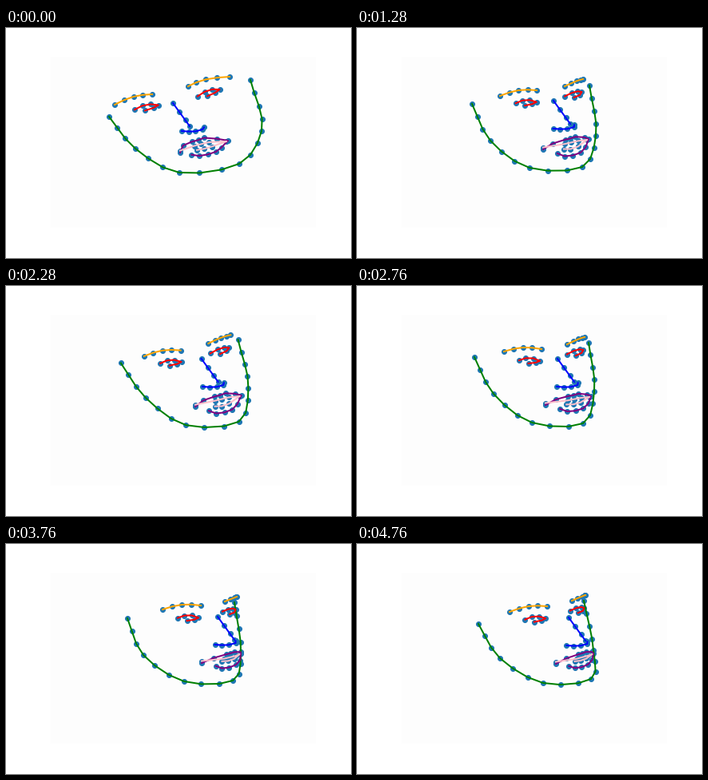
A matplotlib script for the animation above (4800 ms loop, 432 by 288 pixels).

```python
import numpy as np
import matplotlib.pyplot as plt
from matplotlib.animation import FuncAnimation
from matplotlib.patches import Rectangle

W, H, DPI = 432, 288, 72
FRAMES, STEP = 120, 40

# Face parts in landmark order: colour and number of points.
PARTS = [("green", 17), ("orange", 5), ("orange", 5), ("blue", 4), ("blue", 5),
         ("red", 6), ("red", 6), ("purple", 12), ("pink", 8)]
JAW_KNOTS = np.array([0, 3, 6, 9, 12, 16])


def mix(a, b, k):
    return a + (b - a) * k


def along(a, b, part, drop):
    """Points at fractions of the line from a to b, moved down by drop."""
    part, drop = np.broadcast_arrays(part, drop)
    return a + np.outer(part, b - a) + np.outer(drop, (0, 1))


def jaw_curve(knots):
    """Smooth cubic through the knots, sampled at the 17 jaw landmarks."""
    slope = np.gradient(knots, JAW_KNOTS, axis=0)
    i = np.arange(17)
    j = np.clip(np.searchsorted(JAW_KNOTS, i, "right") - 1, 0, 4)
    span = (JAW_KNOTS[j + 1] - JAW_KNOTS[j])[:, None]
    s = (i - JAW_KNOTS[j])[:, None] / span
    ease = s * s * (3 - 2 * s)
    return (mix(knots[j], knots[j + 1], ease)
            + span * s * (1 - s) * ((1 - s) * slope[j] - s * slope[j + 1]))


def eye(a, b, skew=0):
    part = np.array([0, 0.32, 0.67, 1, 0.79, 0.44])
    drop = np.array([0, -3, -3, 0, 2.3, 3.6])
    inner = part % 1 > 0
    return along(a, b, part + skew * inner, drop + 10 * skew * inner)


def lips(a, b, k, gap):
    """Outer and inner lips between corners a and b; k is the squared turn."""
    top = mix(np.array([0.06, 0.25, 0.38, 0.5, 0.77]),
              np.array([0.31, 0.63, 0.73, 0.84, 0.99]), k)
    low = np.array([0.86, 0.75, 0.58, 0.4, 0.24]) + 0.12 * k
    top_drop = (7 * k - 10.5) * np.array([0.75, 0.95, 0.95, 1.05, 0.55])
    low_drop = gap * np.array([0.6, 0.92, 1, 0.92, 0.57])
    outer = along(a, b, np.r_[0, top, 1, low], np.r_[0, top_drop, 0, low_drop])

    top = np.array([0.3, 0.44, 0.6]) + 0.28 * k
    low = np.array([0.66, 0.5, 0.35]) + 0.17 * k
    low_drop = 0.8 * (gap - 8) * np.array([1, 1.15, 0.85])
    inner = along(a, b, np.r_[0, top, 0.97, low],
                  np.r_[-2.5, np.full(3, 5.5 * k - 4), 0.5, low_drop])
    return outer, inner


def face(jaw, brow_l, brow_r, tip, mouth, gap):
    """Build all landmarks from a few key points; gap is the lower lip's drop."""
    jaw, brow_l, brow_r, tip, mouth = map(np.array, (jaw, brow_l, brow_r, tip, mouth))
    s = np.linspace(0, 1, 5)
    arch = -3.5 * np.sin(np.pi * s)

    # The far brow shortens as the head turns away.
    turn = (52 - (brow_r[1] - brow_r[0])[0]) / 37
    k = turn * turn
    left = along(*brow_l, s, arch)
    right = along(*brow_r, s + (1.4 * k - 0.3) * s * (1 - s), arch * (1 - turn))

    bridge = along(tip - (21, 29), tip, np.array([0, 0.38, 0.74, 1]), 0)
    base_x = -10 - 14.5 * turn + np.minimum(8.7 * np.arange(5), 28 - 2 * turn)
    base = tip + np.c_[base_x, [6, 6.6, 6.4, 4, 1.3]]

    across = brow_l[1] - brow_l[0]
    down = np.array([-across[1], across[0]])
    corner = brow_l[0] + (0.46 - 0.09 * turn) * across + 0.26 * down
    eye_l = eye(corner, corner + (0.62 - 0.08 * turn) * across + 0.05 * down)
    eye_r = eye(brow_r[0] + (12 - 15 * turn, 12.5),
                brow_r[1] + (-1.5 - 11 * (1 - turn) ** 4, 16), 0.12 * turn)

    return np.concatenate([jaw_curve(jaw), left, right, bridge, base,
                           eye_l, eye_r, *lips(*mouth, k, gap)])


front = face([(129, 111), (162, 151), (217, 181), (292, 170), (320, 129), (306, 65)],
             [(136, 96), (183, 83)], [(228, 73), (280, 61)],
             (230, 123), [(218, 156), (278, 141)], 11)
smile = face([(135, 110), (174, 150), (226, 180), (296, 170), (314, 125), (296, 63)],
             [(145, 100), (187, 85)], [(227, 72), (270, 61)],
             (237, 122), [(225, 158), (282, 140)], 16.5)
turned = face([(144, 95), (167, 141), (216, 175), (282, 174), (299, 135), (291, 72)],
              [(179, 85), (225, 78)], [(260, 73), (283, 64)],
              (267, 120), [(233, 152), (290, 139)], 16)
half = face([(141, 103), (178, 144), (231, 177), (299, 168), (309, 124), (291, 64)],
            [(163, 93), (208, 82)], [(245, 71), (278, 59)],
            (260, 120), [(238, 153), (296, 136)], 17.5)
lift = face([(147, 89), (171, 135), (219, 171), (283, 172), (297, 132), (290, 71)],
            [(184, 82), (231, 79)], [(263, 73), (285, 64)],
            (272, 120), [(236, 149), (293, 138)], 14.5)
side = face([(152, 93), (172, 139), (223, 172), (284, 171), (294, 137), (286, 73)],
            [(196, 82), (244, 77)], [(274, 72), (289, 66)],
            (286, 120), [(245, 149), (294, 137)], 14)
rest = face([(152, 100), (179, 143), (233, 174), (293, 169), (296, 133), (284, 71)],
            [(191, 85), (238, 78)], [(269, 71), (286, 64)],
            (286, 121), [(249, 150), (296, 137)], 13)

# The head swings partly back between the later poses.
KEYS = [(0, front), (320, front + (4, 2)), (640, smile), (1280, turned),
        (1840, half), (2760, lift), (3200, mix(half, lift, 0.35)),
        (3760, side), (4200, mix(half, lift, 0.7)), (4760, rest)]


def pose_at(t):
    for (t0, a), (t1, b) in zip(KEYS, KEYS[1:]):
        if t <= t1:
            k = (t - t0) / (t1 - t0)
            return mix(a, b, k * k * (3 - 2 * k))
    return KEYS[-1][1]


fig = plt.figure(figsize=(W / DPI, H / DPI), dpi=DPI, facecolor="white")
ax = fig.add_axes([0, 0, 1, 1])
ax.set_xlim(0, W)
ax.set_ylim(H, 0)
ax.axis("off")
ax.add_patch(Rectangle((56, 36), 332, 214, color="#fdfdfd", lw=0, zorder=0))
dots = ax.scatter(front[:, 0], front[:, 1], s=36, color="C0", zorder=1)
lines = [ax.plot([], [], color=color, lw=2)[0] for color, _ in PARTS]


def update(i):
    points = pose_at(i * STEP)
    dots.set_offsets(points)
    start = 0
    for line, (_, count) in zip(lines, PARTS):
        line.set_data(*points[start:start + count].T)
        start += count
    return [dots, *lines]


anim = FuncAnimation(fig, update, frames=FRAMES, interval=STEP, repeat=True)
plt.show()
```
